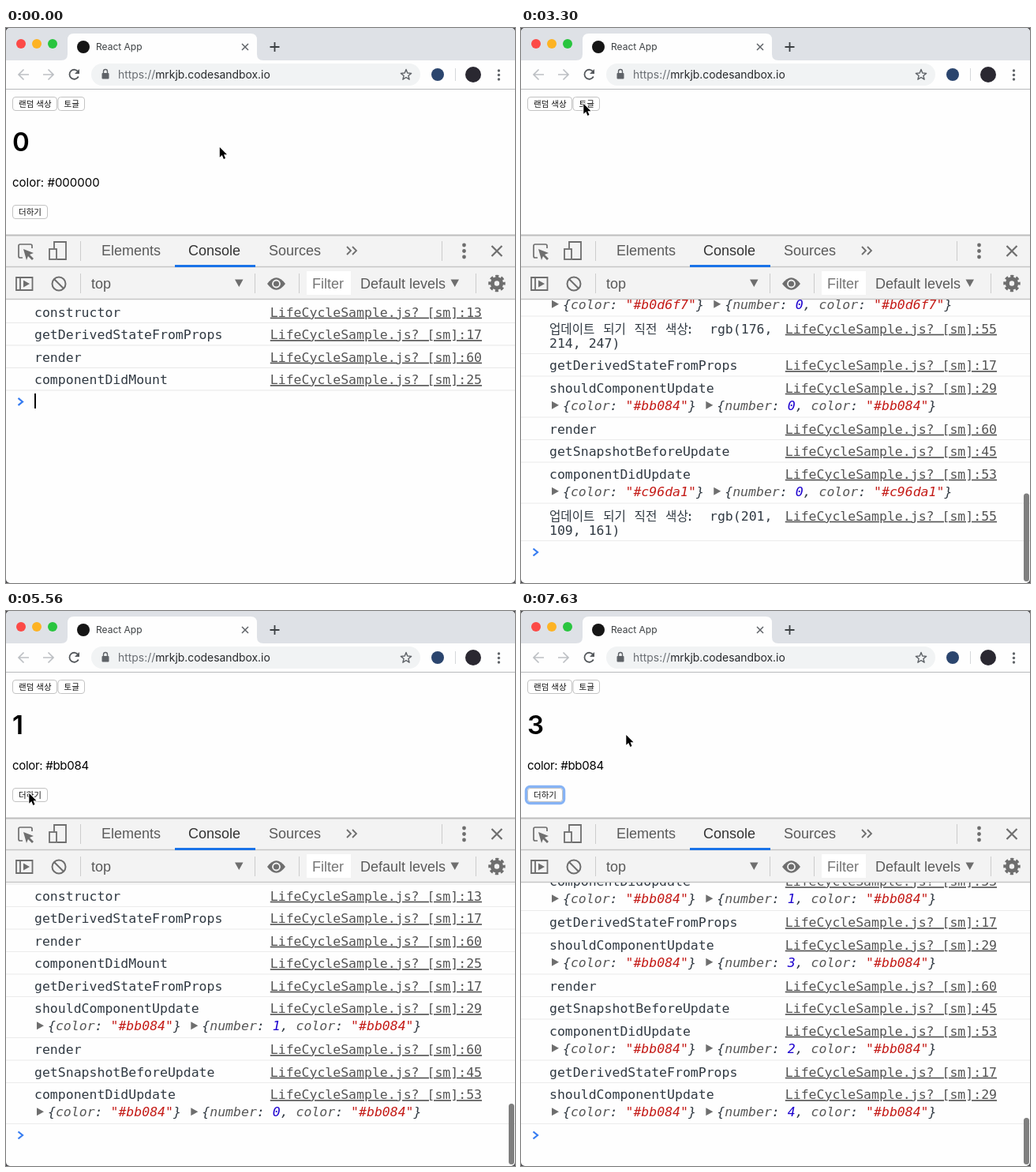
These frames come from a looping animation (645 by 703 pixels, 8030 ms). An HTML page:

```html
<!DOCTYPE html>
<html lang="ko">
<head>
<meta charset="utf-8">
<title>React App</title>
<style>
html, body { margin: 0; width: 100%; height: 100%; overflow: hidden; background: #4a4a4e; }
svg { display: block; width: 645px; height: 703px; }
text { white-space: pre; }
.ui { font-family: Inter, sans-serif; }
.bar { font: 18px "Liberation Sans", Arial, sans-serif; fill: #5a5a5a; }
.ko { font-family: "Noto Sans CJK KR", "Noto Sans CJK", sans-serif; }
.mono { font: 16.5px "DejaVu Sans Mono", monospace; fill: #303942; }
.link { fill: #545454; text-decoration: underline; }
.obj { font-style: italic; fill: #303942; }
.key { fill: #565656; }
.str { fill: #c41a16; }
.num { fill: #1c00cf; }
.sep { stroke: #ccc; }
.icon { fill: none; stroke: #6e6e6e; stroke-width: 2; }
</style>
</head>
<body>
<svg viewBox="0 0 645 703" xmlns="http://www.w3.org/2000/svg">
  <defs>
    <clipPath id="win"><rect width="645" height="703" rx="5"/></clipPath>
    <clipPath id="logClip"><rect y="344" width="645" height="359"/></clipPath>
    <linearGradient id="blue" x2="0" y2="1">
      <stop stop-color="#6cb0f9"/><stop offset="1" stop-color="#1670f3"/>
    </linearGradient>
  </defs>
  <g clip-path="url(#win)">
    <rect width="645" height="703" fill="#fefefe"/>

    <!-- tab strip -->
    <rect width="645" height="41" fill="#dee1e6"/>
    <circle cx="19" cy="20" r="6" fill="#fc4a47"/>
    <circle cx="39" cy="20" r="6" fill="#fdb324"/>
    <circle cx="59" cy="20" r="6" fill="#29c53f"/>
    <path d="M70 41q8 0 8-8V15q0-8 8-8H310q8 0 8 8V33q0 8 8 8z" fill="#fefefe"/>
    <circle cx="98" cy="24" r="8" fill="#151515"/>
    <text class="ui" x="114" y="28" font-size="12" fill="#3c4043">React App</text>
    <path d="M299 20l8 8m0-8l-8 8" stroke="#5f6368" stroke-width="1.5"/>
    <path d="M334.500 24h12m-6-6v12" stroke="#3c4043" stroke-width="1.800"/>

    <!-- address bar -->
    <g fill="none" stroke="#bdc0c4" stroke-width="1.700">
      <path d="M29 59H16m6.500-6.500L16 59l6.500 6.500M47 59H60m-6.500-6.500L60 59l-6.500 6.500"/>
    </g>
    <path d="M91.500 55.500a6 6 0 1 0 .3 6" fill="none" stroke="#54585c" stroke-width="1.800"/>
    <path d="M93 52v6h-6z" fill="#54585c"/>
    <rect x="108" y="45" width="417" height="28" rx="14" fill="#f1f3f4"/>
    <rect x="121.500" y="57" width="9" height="7.500" rx="1" fill="#5f6368"/>
    <path d="M123.500 57v-2a2.500 2.500 0 0 1 5 0v2" fill="none" stroke="#5f6368" stroke-width="1.400"/>
    <text class="ui" x="142" y="64" font-size="13.900" fill="#6a6e73">https://<tspan fill="#26282b">mrkjb.codesandbox.io</tspan></text>
    <path id="star" fill="none" stroke="#5f6368" stroke-width="1.400" stroke-linejoin="round"/>
    <circle cx="547" cy="59" r="8" fill="#2b456e"/>
    <path d="M569.500 51v16" stroke="#d5d7da"/>
    <circle cx="592" cy="59" r="10" fill="#2a2831"/>
    <g fill="#5f6368"><circle cx="624.500" cy="54" r="1.700"/><circle cx="624.500" cy="59.500" r="1.700"/><circle cx="624.500" cy="65" r="1.700"/></g>
    <path d="M0 77.500H645" stroke="#b8babc"/>

    <!-- page -->
    <g id="page"></g>
    <g id="count" class="ui">
      <text id="head" x="8" y="156" font-size="33" font-weight="600"></text>
      <text id="color" x="8" y="201" font-size="15"></text>
    </g>

    <!-- devtools -->
    <rect y="262" width="645" height="82" fill="#f3f3f3"/>
    <path d="M0 262.500H645" stroke="#bdbdbd" stroke-width="2"/>
    <path d="M0 302.500H645M0 343.500H645" stroke="#c6c6c6" stroke-width="1.500"/>
    <rect x="214" y="300" width="102" height="3" fill="#1a73e8"/>
    <g class="bar">
      <text x="121" y="288">Elements</text>
      <text x="231" y="288" fill="#333">Console</text>
      <text x="333" y="288">Sources</text>
      <text x="108" y="329.500">top</text>
      <rect x="381" y="308" width="56" height="30" fill="#fff"/>
      <text x="388" y="329.500" style="fill:#757575">Filter</text>
      <text x="449" y="329.500">Default levels</text>
      <path d="M290 318.500h10.500l-5.250 9.500zM563.500 318.500h10.500l-5.250 9.500z" fill="#6e6e6e"/>
    </g>
    <path class="sep" d="M94.500 270v25M552.500 270v25M94.500 311v25M315.500 311v25M371.500 311v25M595.500 311v25"/>
    <g class="icon">
      <path d="M21 291H18q-2 0-2-2V276q0-2 2-2H31q2 0 2 2v3" stroke-width="1.700"/>
      <path d="M22 280l13 5-5 2 5 5-2 2-5-5-2 5z" fill="#6e6e6e" stroke="none"/>
      <path d="M61 279v-8h15v22H65" stroke-width="1.800"/>
      <rect x="55" y="280" width="9" height="13" stroke-width="1.800"/>
      <path d="M432 277l5 5-5 5m7-10l5 5-5 5" stroke-width="1.800"/>
      <path d="M615.500 276l13 13m0-13l-13 13" stroke-width="2.200"/>
      <path d="M13 316H33.500V332H13zM18 316v16" stroke-width="1.800"/>
      <path d="M22 319.500l8 4.500-8 4.500z" fill="#6e6e6e" stroke="none"/>
      <circle cx="67" cy="324" r="8.500"/><path d="M61 318l12 12"/>
      <path d="M331 324q11.500-15.500 23 0-11.500 15.500-23 0z" fill="#6e6e6e" stroke="none"/>
      <circle cx="342.500" cy="324" r="4.500" fill="#6e6e6e" stroke="#f3f3f3" stroke-width="1.800"/>
      <circle cx="622" cy="323.500" r="5.700" stroke-width="5"/>
      <circle cx="622" cy="323.500" r="9" stroke-width="3.500" stroke-dasharray="4 3.069" stroke-dashoffset="2"/>
    </g>
    <g fill="#6e6e6e"><circle cx="580.500" cy="275" r="2.400"/><circle cx="580.500" cy="282.500" r="2.400"/><circle cx="580.500" cy="290" r="2.400"/></g>

    <g clip-path="url(#logClip)">
      <g id="log" class="mono"></g>
      <g id="prompt">
        <path d="M15.500-4.500l5.500 4.500-5.500 4.500" fill="none" stroke="#367cf1" stroke-width="2.200"/>
        <rect id="caret" x="36" y="-10.500" width="2" height="19" fill="#000"/>
      </g>
      <rect id="thumb" x="637" width="7" rx="3.500" fill="#7f7f7f"/>
    </g>
    <path id="mouse" d="M.8 1.500V14.300L3.800 11.600 5.900 16.500 8 15.600 6 10.800H10z" fill="#000" stroke="#fff" stroke-width="1.800" paint-order="stroke"/>
  </g>
</svg>
<script>
const LOOP = 8030, TOP = 345.4, BOTTOM = 650, VIEW = 359, CHAR = 9.93;
const $ = id => document.getElementById(id);
const LINES = {
  constructor: 13, getDerivedStateFromProps: 17, componentDidMount: 25, shouldComponentUpdate: 29,
  componentWillUnmount: 35, getSnapshotBeforeUpdate: 45, componentDidUpdate: 53, render: 60
};
const COLORS = ['#000000', '#236f28', '#b0d6f7', '#c96da1', '#bb084'];

// Clicks: button, press, release, first log batch, second log batch
const clicks = [
  ['random', 1130, 1230, 1230, 1230], ['random', 1460, 1600, 1630, 1660],
  ['random', 2060, 2160, 2200, 2230], ['random', 2630, 2760, 2800, 2830],
  ['toggle', 3200, 3300, 3330], ['toggle', 3600, 3730, 3730],
  ['toggle', 4060, 4160, 4200], ['toggle', 4530, 4660, 4660],
  ['add', 5430, 5530, 5560, 5560], ['add', 5700, 5800, 5830, 5860],
  ['add', 6060, 6200, 6230, 6260], ['add', 6430, 6530, 6560]
];

// Mouse moves: start, end, from, to
const moves = [
  [330, 1100, [270, 149.5], [33.5, 95]],
  [2860, 3060, [33.5, 95], [78.5, 94.5]],
  [4860, 5400, [78.5, 94.5], [28.5, 229.5]],
  [6760, 7610, [28.5, 229.5], [132.5, 155.5]]
];

const buttons = {
  random: [8, 87, 57, '랜덤 색상'], toggle: [65.5, 87, 34.5, '토글'], add: [8, 224, 45, '더하기']
};

function buttonSvg(id) {
  const [x, y, w, label] = buttons[id];
  const ring = id === 'add' ? `<rect id="ring" x="${x - 1.5}" y="${y - 1.5}" width="${w + 3}" height="21" rx="5" fill="none" stroke="#86b3f5" stroke-width="3.500"/>` : '';
  return `<g id="${id}">${ring}<rect class="face" x="${x + .5}" y="${y + .5}" width="${w - 1}" height="17" rx="3.500"/>` +
    `<text class="ko" x="${x + 8}" y="${y + 13}" font-size="10.500">${label}</text></g>`;
}

const rows = [], states = [{ t: 0, color: COLORS[0], num: 0, shown: true }];
let total = 0;

const link = (y, line) =>
  `<text class="link" x="603" y="${y}" text-anchor="end">LifeCycleSample.js? [sm]:${line}</text>`;
const arrow = (x, y) => `<path d="M${x} ${y - 11}l9 5-9 5z" fill="#6e6e6e"/>`;
const colorPart = c => `<tspan class="key">color</tspan>: <tspan class="str">"${c}"</tspan>}`;

function pair(y, color, num) {
  const end = 53 + CHAR * (color.length + 11);
  return arrow(39, y) + `<text class="obj" x="53" y="${y}">{${colorPart(color)}</text>` +
    arrow(end + 12.5, y) + `<text class="obj" x="${end + 26.5}" y="${y}">` +
    `{<tspan class="key">number</tspan>: <tspan class="num">${num}</tspan>, ${colorPart(color)}</text>`;
}

function addRow(t, height, body) {
  total += height;
  rows.push({ t, end: total, svg: `<g>${body}<path d="M0 ${total - .5}H645" stroke="#ebebeb" stroke-width="1.200"/></g>` });
}

function log(t, name, color, num) {
  const y = total + 20.2;
  addRow(t, color ? 52 : 28.5, `<text x="36" y="${y}">${name}</text>` + link(y, LINES[name]) +
    (color ? pair(y + 22, color, num) : ''));
}

function logColor(t, color) {
  const y = total + 21.2;
  const [r, g, b] = [1, 3, 5].map(i => parseInt(color.slice(i, i + 2), 16));
  const [a, z] = g < 10 ? [`${r}, ${g},`, `${b})`] : [`${r},`, `${g}, ${b})`];
  addRow(t, 47.5, `<text class="ko" x="36" y="${y}" font-size="15.600" style="word-spacing:6.400px">업데이트 되기 직전 색상</text>` +
    `<text x="209" y="${y}">:</text><text x="239" y="${y}">rgb(${a}</text>` +
    `<text x="36" y="${y + 18.7}">${z}</text>` + link(y, 55));
}

const mount = t => ['constructor', 'getDerivedStateFromProps', 'render', 'componentDidMount'].forEach(n => log(t, n));

function update(t1, t2, prev, next) {
  log(t1, 'getDerivedStateFromProps');
  log(t1, 'shouldComponentUpdate', next.color, next.num);
  if (next.num % 10 === 4) return false;
  log(t1, 'render');
  log(t1, 'getSnapshotBeforeUpdate');
  log(t2, 'componentDidUpdate', prev.color, prev.num);
  if (prev.color !== next.color) logColor(t2, prev.color);
  return true;
}

mount(0);
for (const [kind, , up, t1, t2] of clicks) {
  const prev = states[states.length - 1], next = { ...prev, t: up };
  if (kind === 'toggle') {
    next.shown = !prev.shown;
    if (next.shown) mount(t1); else log(t1, 'componentWillUnmount');
    states.push(next);
    continue;
  }
  if (kind === 'random') next.color = COLORS[COLORS.indexOf(prev.color) + 1];
  else next.num++;
  if (update(t1, t2, prev, next)) states.push(next);
}

$('page').innerHTML = buttonSvg('random') + buttonSvg('toggle');
$('count').insertAdjacentHTML('beforeend', buttonSvg('add'));
$('log').innerHTML = rows.map(r => r.svg).join('');
const rowEls = [...$('log').children];
$('star').setAttribute('d', 'M' + Array.from({ length: 10 }, (_, i) => {
  const r = i % 2 ? 3 : 7, a = Math.PI * (i / 5 - .5);
  return `${507 + r * Math.cos(a)} ${59.5 + r * Math.sin(a)}`;
}).join('L') + 'z');

const show = (el, on) => el.setAttribute('display', on ? 'inline' : 'none');
const ease = p => p * p * (3 - 2 * p);

function mouseAt(t) {
  let pos = moves[0][2];
  for (const [a, b, from, to] of moves) {
    if (t < a) break;
    const p = ease(Math.min(1, (t - a) / (b - a)));
    pos = from.map((v, i) => v + (to[i] - v) * p);
  }
  return pos;
}

function draw(t) {
  const state = states.filter(s => s.t <= t).pop();
  show($('count'), state.shown);
  $('head').textContent = state.num;
  $('head').setAttribute('fill', state.color.length === 7 ? state.color : '#000');
  $('color').textContent = 'color: ' + state.color;
  $('color').style.letterSpacing = state.color === COLORS[0] ? '0' : '-.3px';

  for (const id in buttons) {
    const down = clicks.some(c => c[0] === id && t >= c[1] && t < c[2]);
    const face = $(id).querySelector('.face');
    face.setAttribute('fill', down ? 'url(#blue)' : '#fff');
    face.setAttribute('stroke', down ? '#2f7ae5' : '#c3c3c3');
    $(id).querySelector('text').setAttribute('fill', down ? '#fff' : '#111');
  }
  show($('ring'), t >= 7600);
  $('ring').setAttribute('opacity', t < 7630 ? .5 : 1);

  const count = rows.filter(r => r.t <= t).length;
  const height = rows[count - 1].end;
  const bottom = Math.min(BOTTOM, TOP + height);
  rowEls.forEach((el, i) => show(el, i < count));
  $('log').setAttribute('transform', `translate(0 ${bottom - height})`);
  $('prompt').setAttribute('transform', `translate(0 ${bottom + 14})`);
  show($('caret'), t < 160 || (t >= 660 && t < 1160));

  const full = height + 53, size = VIEW * VIEW / full - 4;
  show($('thumb'), full > VIEW);
  $('thumb').setAttribute('height', size);
  $('thumb').setAttribute('y', 701 - size);

  $('mouse').setAttribute('transform', `translate(${mouseAt(t).join(' ')})`);
}

const start = performance.now();
function tick() {
  draw((performance.now() - start) % LOOP);
  requestAnimationFrame(tick);
}
draw(0);
requestAnimationFrame(tick);
</script>
</body>
</html>
```
